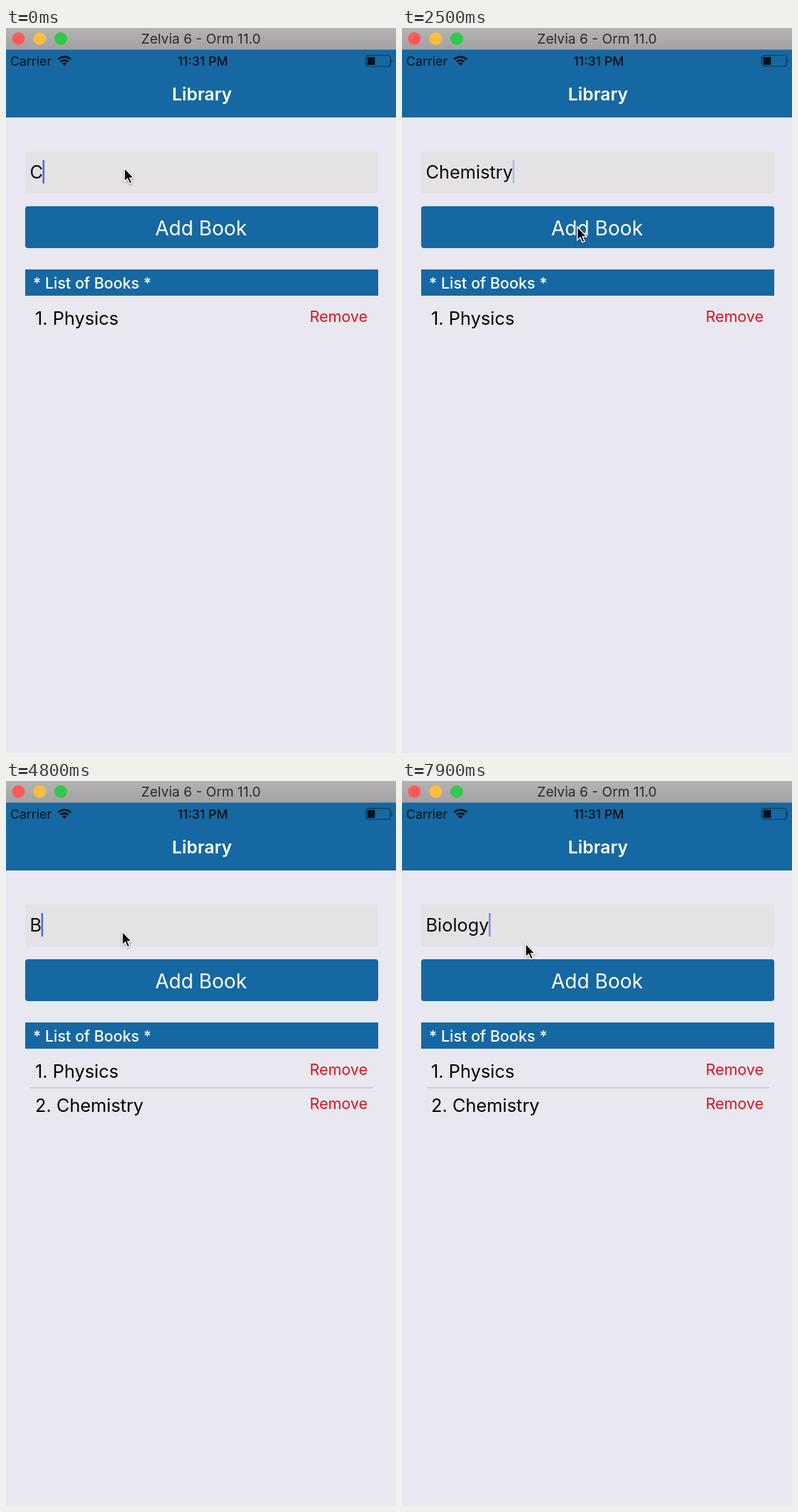
An HTML page for the animation above (8 s loop, 549 px wide and 1021 px high).

```html
<!DOCTYPE html>
<html lang="en">
<head>
<meta charset="utf-8">
<title>Library</title>
<style>
  html, body { margin: 0; width: 100%; height: 100%; overflow: hidden; background: #e9e8f1; }
  svg { display: block; width: 100%; height: 100%; font-family: Inter, Roboto, sans-serif; }
  .blue { fill: #1668a2; }
  .white { fill: #fff; }
  .body { font-size: 25.4px; }
  .remove { font-size: 21.5px; fill: #e3101c; text-anchor: end; }
  .middle { text-anchor: middle; }
  #pointer { filter: drop-shadow(0 1.5px 1.5px rgba(0, 0, 0, .35)); }
</style>
</head>
<body>
<svg viewBox="0 0 549 1021">
  <defs>
    <linearGradient id="titleBar" x2="0" y2="1">
      <stop offset="0" stop-color="#b5b2b4"/>
      <stop offset="1" stop-color="#a3a1a3"/>
    </linearGradient>
  </defs>
  <rect width="549" height="1021" fill="#e9e8f1"/>

  <!-- Window title bar -->
  <rect width="549" height="31" fill="url(#titleBar)"/>
  <circle cx="17.5" cy="15" r="9" fill="#fc5b57"/>
  <circle cx="47.5" cy="15" r="9" fill="#fdbe40"/>
  <circle cx="77" cy="15" r="9" fill="#34c84a"/>
  <text class="middle" x="274.5" y="22" font-size="19.2" fill="#2b2a2b">Zelvia 6 - Orm 11.0</text>

  <!-- Status and navigation bars -->
  <rect class="blue" y="30.5" width="549" height="95.5"/>
  <g fill="#06121c">
    <text x="6" y="53" font-size="17.8">Carrier</text>
    <text class="middle" x="277" y="53" font-size="17.8" font-weight="500">11:31 PM</text>
    <g transform="translate(82.3 53)">
      <path d="M0 0L-3.2 -3.2A4.5 4.5 0 0 1 3.2 -3.2Z"/>
      <path d="M-5.4 -5.4A7.6 7.6 0 0 1 5.4 -5.4M-8.8 -8.8A12.5 12.5 0 0 1 8.8 -8.8"
            fill="none" stroke="#06121c" stroke-width="2.7"/>
    </g>
    <rect x="506.5" y="38.5" width="34.5" height="15.5" rx="3.5" fill="none" stroke="#06121c" stroke-opacity=".6" stroke-width="1.2"/>
    <rect x="508.7" y="40.7" width="10.6" height="11.2" rx="1"/>
    <path d="M542.5 43.5q2.6 2.8 0 5.6z" opacity=".6"/>
  </g>
  <text class="white middle" x="276" y="102" font-size="24.7" font-weight="600">Library</text>

  <!-- Form -->
  <rect x="27" y="174" width="497" height="59" rx="3" fill="#e4e2e4"/>
  <rect id="selection" x="31" y="183" height="38" fill="#b8c9d8"/>
  <text id="placeholder" class="body" x="34" y="212" fill="#b3b2b6">Enter Book name</text>
  <text id="entry" class="body" x="33.4" y="212" fill="#0a0a0a"></text>
  <rect id="caret" y="186" width="2.5" height="33" fill="#3f6fdc"/>
  <rect class="blue" x="27" y="251" width="497" height="59" rx="4"/>
  <text class="white middle" x="274.5" y="291.5" font-size="28.1">Add Book</text>

  <!-- List -->
  <rect class="blue" x="27" y="340" width="497" height="37"/>
  <text class="white" x="38" y="367" font-size="21.5" font-weight="500">* List of Books *</text>
  <text class="body" x="41" y="417.5">1. Physics</text>
  <text class="remove" x="509" y="413.5">Remove</text>
  <g id="secondRow">
    <path d="M34 432H517" stroke="#c8c7cd" stroke-width="1.5"/>
    <text class="body" x="41" y="466">2. Chemistry</text>
    <text class="remove" x="509" y="461.7">Remove</text>
  </g>

  <!-- Autocorrect bubble -->
  <g id="bubble">
    <path d="M30.5 221H171A19.5 19.5 0 0 1 171 260H30.5Z" fill="#fff" stroke="#b4b3b8"/>
    <text class="body" x="33.4" y="250" fill="#1f66d0">Chemistry</text>
    <path d="M164.5 235l11 11m0 -11l-11 11" stroke="#b5b5b8" stroke-width="1.5"/>
  </g>

  <path id="pointer" d="M0 0V19L4.3 15L7.2 21.8L10.4 20.5L7.5 13.8H13.2Z" stroke="#fff" stroke-width="1.4"/>
</svg>

<script>
const LOOP = 8000, STEP = 100;
const ROW_ADDED = 2800;

// [time, field contents]
const typing = [
  [0, "C"], [200, "Ch"], [400, "Che"], [600, "Chem"], [800, "Chemi"], [1000, "Chemis"],
  [1300, "Chemist"], [1400, "Chemistr"], [1600, "Chemistry"], [ROW_ADDED, ""],
  [4600, "B"], [4900, "Bi"], [5100, "Bio"], [5300, "Biol"], [5600, "Biolo"],
  [5900, "Biolog"], [6300, "Biology"]
];

// [start, end, x, y]: each move begins where the previous one stopped
const moves = [
  [0, 0, 166.7, 197.3], [2000, 2500, 246.7, 280], [3200, 3900, 163.7, 212], [7500, 7900, 174, 229]
];

const part = Object.fromEntries(
  [...document.querySelectorAll("svg [id]")].map(node => [node.id, node]));
const show = (node, visible) => node.setAttribute("visibility", visible ? "visible" : "hidden");
const clamp = value => Math.min(1, Math.max(0, value));

function pointerAt(time) {
  let [, , x, y] = moves[0];
  for (const [start, end, toX, toY] of moves.slice(1)) {
    const p = clamp((time - start) / (end - start));
    const eased = p * p * (3 - 2 * p);
    x += (toX - x) * eased;
    y += (toY - y) * eased;
  }
  return [x, y];
}

function caretOpacity(idle) {
  const phase = idle % 1000;
  return phase < 850 ? clamp((800 - phase) / 300) : (phase - 850) / 150;
}

function draw(time) {
  const [since, text] = typing.findLast(([start]) => start <= time);
  const correcting = time >= 800 && time < 1600;

  part.entry.textContent = text;
  const width = text ? part.entry.getComputedTextLength() : 1.2;
  part.caret.setAttribute("x", 33 + width);
  part.caret.setAttribute("opacity", caretOpacity(time - since));
  part.selection.setAttribute("width", width + 2);

  show(part.placeholder, !text);
  show(part.selection, correcting);
  show(part.bubble, correcting);
  show(part.secondRow, time >= ROW_ADDED);
  part.pointer.setAttribute("transform", `translate(${pointerAt(time)})`);
}

const began = performance.now();
function tick() {
  const elapsed = (performance.now() - began) % LOOP;
  draw(Math.floor(elapsed / STEP) * STEP);
  requestAnimationFrame(tick);
}
tick();
</script>
</body>
</html>
```
